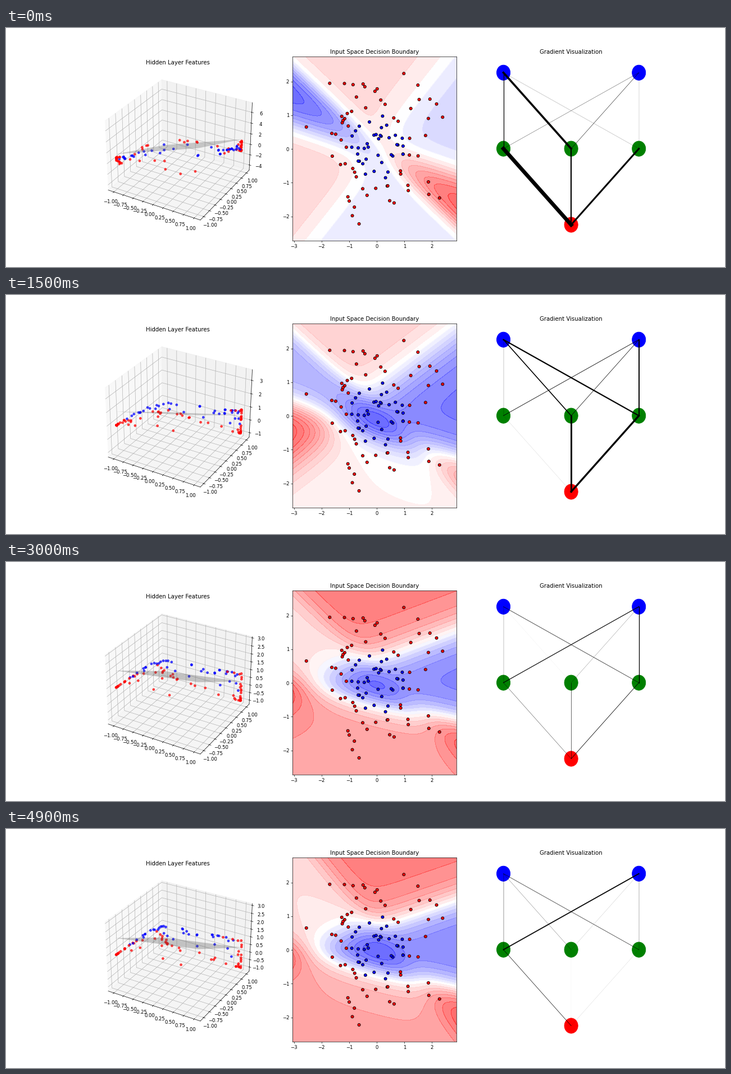
A matplotlib script that plays this animation: 1280 by 427 pixels, repeating every 5000 ms.

```python
import numpy as np
import matplotlib.pyplot as plt
from matplotlib.animation import FuncAnimation
from matplotlib.patches import Circle

FRAMES = 50
STEPS_PER_FRAME = 10
RATE = 0.1
DPI = 1280 / 21


def make_data(n=100):
    np.random.seed(0)
    pts = np.random.randn(n, 2)
    labels = np.where((pts ** 2).sum(axis=1) > 1, 1.0, -1.0)
    return pts, labels.reshape(-1, 1)


class MLP:
    """Two inputs, three tanh units and one linear output."""

    def __init__(self):
        np.random.seed(0)
        self.W1 = np.random.randn(2, 3)
        self.b1 = np.zeros(3)
        self.W2 = np.random.randn(3, 1)
        self.b2 = np.zeros(1)

    def forward(self, X):
        self.hidden = np.tanh(X @ self.W1 + self.b1)
        return self.hidden @ self.W2 + self.b2

    def step(self, X, y):
        err = (self.forward(X) - y) / len(X)
        back = err @ self.W2.T * (1 - self.hidden ** 2)
        self.dW1, self.dW2 = X.T @ back, self.hidden.T @ err
        self.W1 = self.W1 - RATE * self.dW1
        self.b1 = self.b1 - RATE * back.sum(axis=0)
        self.W2 = self.W2 - RATE * self.dW2
        self.b2 = self.b2 - RATE * err.sum(axis=0)


def train(X, y, xx, yy):
    """Record the state of the network for every frame."""
    net = MLP()
    grid = np.c_[xx.ravel(), yy.ravel()]
    states = []
    for block in range(FRAMES + 1):
        for _ in range(STEPS_PER_FRAME):
            net.step(X, y)
        if block:
            hidden, grads = net.hidden, (net.dW1, net.dW2)
            field = net.forward(grid).reshape(xx.shape)
            states.append((hidden, grads, field, net.W2.ravel(), net.b2[0]))
    return states


X, y = make_data()
color = y.ravel()
(x0, y0), (x1, y1) = X.min(axis=0) - 0.5, X.max(axis=0) + 0.5
xx, yy = np.meshgrid(np.linspace(x0, x1, 120), np.linspace(y0, y1, 120))
states = train(X, y, xx, yy)
px, py = np.meshgrid(np.linspace(-1, 1, 10), np.linspace(-1, 1, 10))

fig = plt.figure(figsize=(1280.000001 / DPI, 427.000001 / DPI), dpi=DPI)
ax_hidden = fig.add_subplot(131, projection="3d")
ax_input = fig.add_subplot(132)
ax_grad = fig.add_subplot(133)

# Input space: the points stay, only the field changes
ax_input.set_title("Input Space Decision Boundary")
ax_input.scatter(X[:, 0], X[:, 1], c=color, cmap="bwr", edgecolors="k", zorder=2)

# Network diagram
inputs = [(0, 1), (1, 1)]
units = [(0, 0.5), (0.5, 0.5), (1, 0.5)]
output = [(0.5, 0)]
ax_grad.set_title("Gradient Visualization")
ax_grad.set(xlim=(-0.105, 1.105), ylim=(-0.105, 1.105))
ax_grad.axis("off")
for layer, fill in ((inputs, "blue"), (units, "green"), (output, "red")):
    for center in layer:
        ax_grad.add_patch(Circle(center, 0.05, color=fill))


def connect(src, dst):
    return [[ax_grad.plot([a[0], b[0]], [a[1], b[1]], "k-")[0] for b in dst]
            for a in src]


edges = [connect(inputs, units), connect(units, output)]
contours = []


def draw_hidden(hidden, w, b):
    ax_hidden.clear()
    ax_hidden.scatter(*hidden.T, c=color, cmap="bwr", alpha=0.7)
    pz = -(w[0] * px + w[1] * py + b) / w[2]
    ax_hidden.plot_surface(px, py, pz, color="gray", alpha=0.3)
    ax_hidden.set_title("Hidden Layer Features")


def draw_field(field):
    while contours:
        contours.pop().remove()
    contours.append(ax_input.contourf(xx, yy, field, levels=20,
                                      cmap="bwr", alpha=0.6))
    ax_input.set(xlim=(x0, x1), ylim=(y0, y1))


def draw_grads(grads):
    for rows, grad in zip(edges, grads):
        for row, values in zip(rows, grad):
            for line, g in zip(row, values):
                line.set_linewidth(100 * abs(g))


def update(i):
    hidden, grads, field, w, b = states[i]
    draw_hidden(hidden, w, b)
    draw_field(field)
    draw_grads(grads)
    return []


ani = FuncAnimation(fig, update, frames=FRAMES, interval=100, repeat=True,
                    repeat_delay=0)
plt.show()
```
